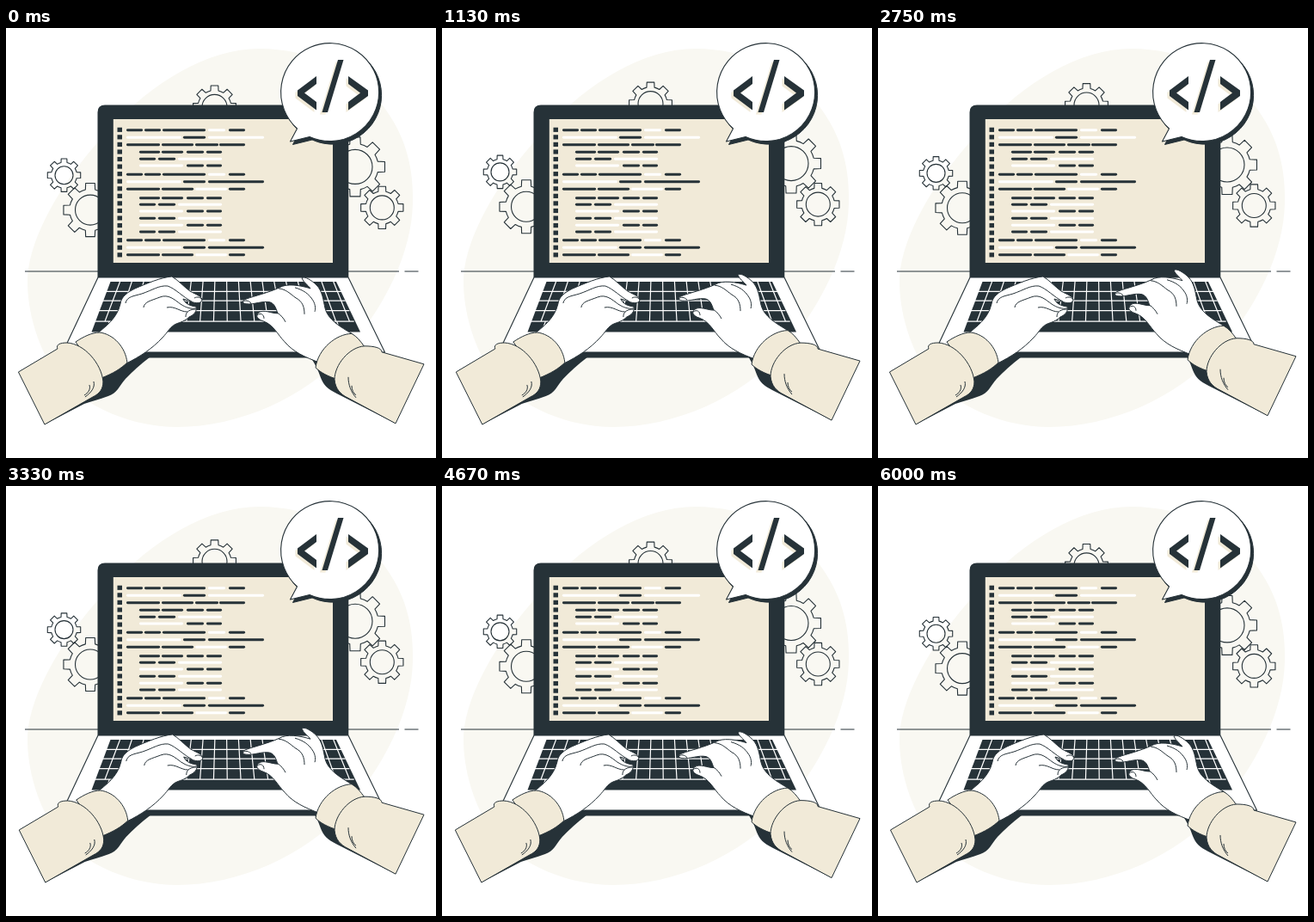
An HTML page with a canvas that plays this animation: 500x500 px, repeating every 6040 ms.

```html
<!DOCTYPE html>
<html lang="en">
<head>
<meta charset="utf-8">
<title>Typing code</title>
<style>
html, body { margin: 0; width: 100%; height: 100%; overflow: hidden; background: #fff; }
canvas { display: block; width: 100vw; height: 100vh; object-fit: contain; }
</style>
</head>
<body>
<canvas id="stage" width="500" height="500"></canvas>
<script>
const ctx = document.getElementById('stage').getContext('2d');
const DARK = '#263238', CREAM = '#f1ead8', PALE = '#f9f8f2', WHITE = '#fff';
const LOOP = 6040, LEAD = 45;

function shape(d, fill, stroke, width = 1) {
  const path = new Path2D(d);
  if (fill) { ctx.fillStyle = fill; ctx.fill(path); }
  if (stroke) { ctx.strokeStyle = stroke; ctx.lineWidth = width; ctx.stroke(path); }
}

function rect(x, y, w, h, color) {
  ctx.fillStyle = color;
  ctx.fillRect(x, y, w, h);
}

function moved(dx, dy, draw) {
  ctx.save();
  ctx.translate(dx, dy);
  draw();
  ctx.restore();
}

// Linear interpolation over equally spaced keys
function keys(list, p) {
  const s = p * (list.length - 1), i = Math.min(Math.floor(s), list.length - 2);
  return list[i] + (list[i + 1] - list[i]) * (s - i);
}

// Backdrop
function backdrop() {
  shape('M295 24C350 24 410 48 443 97C466 130 474 165 473 203C472 262 440 325 393 379' +
    'C347 430 270 464 199 464C150 464 92 443 59 402C38 374 24 330 25 290' +
    'C28 240 68 172 124 114C170 64 234 24 295 24Z', PALE);
  shape('M22 283H108M397 283H457M463.500 283H479.500', null, DARK, 1.1);
}

// Gears
function gear(x, y, r, hole) {
  const root = r * 0.77;
  ctx.beginPath();
  for (let i = 0; i < 8; i++) {
    const a = i * Math.PI / 4;
    const at = (d, k) => ctx.lineTo(x + k * Math.cos(a + d), y + k * Math.sin(a + d));
    at(-0.235, root);
    at(-0.17, r);
    at(0.17, r);
    at(0.235, root);
    ctx.arc(x, y, root, a + 0.235, a + Math.PI / 4 - 0.235);
  }
  ctx.closePath();
  ctx.moveTo(x + hole, y);
  ctx.arc(x, y, hole, 0, Math.PI * 2);
  ctx.strokeStyle = DARK;
  ctx.lineWidth = 1.1;
  ctx.stroke();
}

function gears() {
  gear(242.5, 92.5, 25.3, 14.5);
  gear(67.5, 171.8, 19.5, 10.5);
  gear(98, 212.2, 31.5, 17.5);
  gear(406, 162, 35, 20);
  gear(437.3, 209.5, 25, 14);
}

// Code on the screen: each dash is [start, end, isWhite]
const HEAD = [[141, 158], [162, 179], [183, 231], [236, 254, 1], [260, 277]];
const WIDE = [[141, 203, 1], [207, 231], [236, 299]];
const FULL = [[141, 178], [182, 217], [221, 256, 1], [260, 277]];
const PAIR = [[211, 229], [234, 250]];
const STEP = [[156, 178], [182, 205], ...PAIR];
const NOTE = [[156, 173], [178, 196], [201, 250, 1]];
const TAIL = [[156, 205, 1], ...PAIR];
const ROWS = [
  [118.8, HEAD],
  [127.3, [[141, 203, 1], [207, 231], [236, 299, 1]]],
  [135.8, [[141, 178], [182, 217], [221, 246], [249, 277]]],
  [144.2, STEP], [152.3, NOTE], [160, TAIL],
  [170.3, HEAD], [178.8, WIDE], [187.3, FULL],
  [197.8, STEP], [205.3, NOTE], [213, TAIL],
  [221.3, NOTE], [229.2, TAIL], [237, NOTE],
  [246.8, HEAD], [255.2, WIDE], [263.8, FULL]
];

function code() {
  for (let i = 0; i < 18; i++) rect(129.5, 115.7 + i * 8.56, 5.5, 5.2, DARK);
  ctx.lineCap = 'round';
  ctx.lineWidth = 2.9;
  for (const [y, dashes] of ROWS) {
    for (const [a, b, white] of dashes) {
      ctx.strokeStyle = white ? WHITE : DARK;
      ctx.beginPath();
      ctx.moveTo(a + 0.4, y);
      ctx.lineTo(b - 0.4, y);
      ctx.stroke();
    }
  }
}

// Keyboard: a trapezoid with rows and fanned columns
const MID = 252.5;
const half = y => 131 + (y - 295) * 0.415;

function keyboard() {
  shape('M121.500 295H384L412 353.500H99.500Z', DARK);
  ctx.strokeStyle = WHITE;
  ctx.lineWidth = 1.2;
  ctx.lineCap = 'butt';
  ctx.beginPath();
  for (const y of [306.3, 317.2, 328.6, 341.2]) {
    ctx.moveTo(MID - half(y) - 2, y);
    ctx.lineTo(MID + half(y) + 2, y);
  }
  const column = (k, top, bottom) => {
    ctx.moveTo(MID + k * half(top), top);
    ctx.lineTo(MID + k * half(bottom), bottom);
  };
  for (let i = -9; i <= 9; i++) column((i + 0.3) / 9.5, 295, 341);
  for (const k of [-0.88, -0.73, -0.58, 0.58, 0.73, 0.88]) column(k, 341, 354);
  ctx.stroke();
}

function laptop() {
  shape('M107 290L66 377H440.500L398 290Z', WHITE, DARK, 1.1);
  rect(66, 377, 374.5, 6.5, DARK);
  shape('M106.500 290V98Q106.500 89.500 115 89.500H390Q398.300 89.500 398.300 98V290Z', DARK);
  rect(124.8, 106, 255.2, 167, CREAM);
  code();
  keyboard();
}

// Speech bubble
const BUBBLE = 'M338.500 117A57 57 0 1 1 353 126.500L330.500 132Z';
const TAG = 'M361 56V65L347 75.500L361 86V95.500L339 79V72.500Z' +
  'M386 37H392.500L374 98H367.500Z' +
  'M398 56V65L412 75.500L398 86V95.500L421 79V72.500Z';

function bubble() {
  moved(3, 3.5, () => shape(BUBBLE, DARK, DARK));
  shape(BUBBLE, WHITE, DARK, 1.1);
  moved(-2.5, 2.5, () => shape(TAG, CREAM));
  shape(TAG, DARK);
}

// Arms
function leftArm() {
  shape('M139 388L158 380L167 383C156 391 147 400 139 408C132 416 129 425 119 428' +
    'C108 432 99 434 91 437L45 461L100 415Z', DARK);
  shape('M104 357C116 347 129 338 133 321C134 312 142 307 150 303C164 297 180 290 193 289' +
    'C200 293 206 300 214 306C221 310 229 312 228 317C226 321 219 320 212 317' +
    'L206 315C208 320 213 323 221 324C223 329 218 334 213 336' +
    'C208 341 203 342 198 344C191 347 188 354 182 360C170 373 156 382 140 390Z', WHITE, DARK);
  shape('M139 320C141 312 148 312 158 309C170 305 178 299 188 300C197 303 206 313 216 318' +
    'M160 325C161 318 169 317 179 313C189 309 196 316 203 321C209 325 215 327 221 326' +
    'M187 325C197 323 202 330 211 330M219 314C223 312 226 313 228 316' +
    'M209 336C209 329 215 327 221 327', null, DARK);
  shape('M81 365C90 359 100 354 109 354C125 356 139 371 141 389C134 396 124 402 111 407Z',
    CREAM, DARK);
  shape('M14.500 400L60 373C58 368 63 366 71 366C91 367 111 390 113 411' +
    'C113 420 109 425 101 429L45 461Z', CREAM, DARK);
  shape('M102 411C104 418 99 424 92 429M97 415C99 420 95 425 91 427', null, DARK);
}

function rightArm() {
  shape('M364 386L354 383C359 390 363 398 366 407C369 415 374 420 384 425' +
    'L453 460L420 410Z', DARK);
  shape('M403 356C389 348 374 339 371 326C369 317 368 306 361 299C356 294 347 288 344 291' +
    'C346 296 350 298 354 303C341 299 326 297 318 302C305 308 288 312 280 315' +
    'C274 317 274 320 279 321C289 322 298 317 307 319C313 321 314 327 316 332' +
    'C308 332 300 327 294 331C289 335 293 339 299 341C311 345 316 357 324 365' +
    'C334 377 348 383 364 389Z', WHITE, DARK);
  shape('M317 303C326 304 330 309 337 314C345 318 347 325 347 333' +
    'M336 302C346 305 352 309 357 317C360 322 360 327 359 330' +
    'M275 319C278 316 282 317 285 320M292 334C296 331 300 333 300 338' +
    'M315 331C320 334 323 338 325 342', null, DARK);
  shape('M417 371C412 364 408 359 402 355.500C384 356 363 373 360 395C366 401 374 405 386 409Z',
    CREAM, DARK);
  shape('M486 391L437 377C437 372 428 370 417 370C399 371 382 392 382 409' +
    'C383 420 389 426 397 430L453 460Z', CREAM, DARK);
  shape('M398 406C398 415 401 423 407 430M402 416C402 421 404 425 407 427', null, DARK);
}

function draw(now) {
  const p = ((now + LEAD) % LOOP) / LOOP;
  const drift = keys([0, -10, 0, -10, 0, -10, 0, -10, 0], p);
  const lift = keys([0, -10, 0], p);
  const shake = keys([0, -1, 2, -4, 4, -4, 4, -4, 2, -1, 0], p);

  rect(0, 0, 500, 500, WHITE);
  ctx.lineJoin = 'round';
  ctx.lineCap = 'butt';
  backdrop();
  moved(0, drift, gears);
  laptop();
  bubble();
  moved(shake, 0, leftArm);
  moved(0, lift, rightArm);
}

function tick() {
  draw(performance.now());
  requestAnimationFrame(tick);
}
tick();
</script>
</body>
</html>
```
